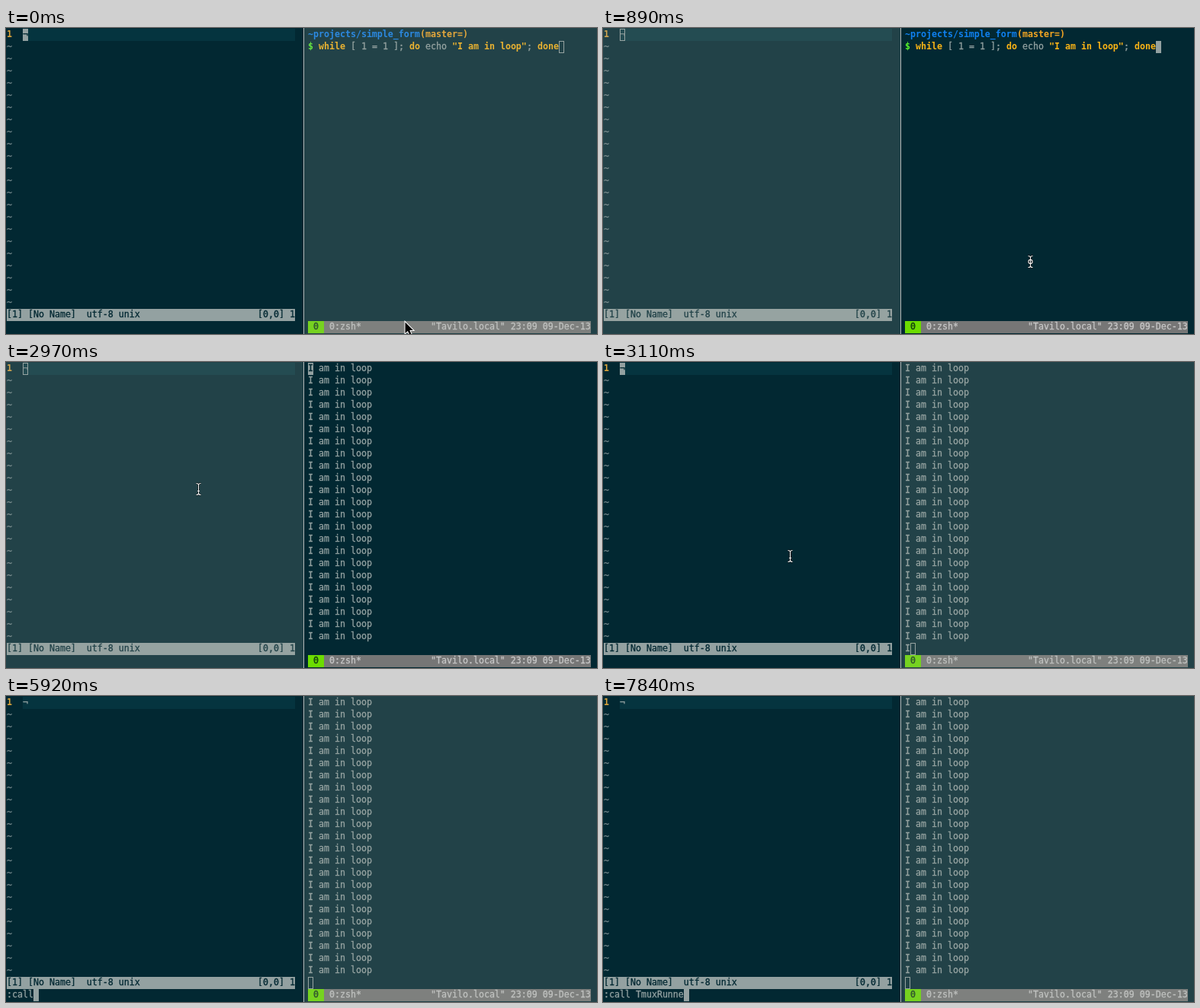
Animation of 775x402 px, one loop 7990 ms. Source, as an HTML page with a canvas:

```html
<!DOCTYPE html>
<html lang="en">
<head>
<meta charset="utf-8">
<title>Editor and terminal split</title>
<style>
html, body { margin: 0; width: 775px; height: 402px; overflow: hidden; background: #022832; }
canvas { display: block; }
</style>
</head>
<body>
<canvas id="stage" width="775" height="402"></canvas>
<script>
const ctx = document.getElementById('stage').getContext('2d');
const W = 775, H = 402, LOOP = 7990, TICK = 147.9, LAST = 53;
const CW = 7, RH = 16, LEFT = 1, RIGHT = 396, SPLIT = 390;
const FACE = '11.627px "DejaVu Sans Mono", monospace';
const C = {
  bg: '#022832', line: '#05343f', text: '#93a1a1', dark: '#022832', tilde: '#75888c',
  number: '#dba43c', blue: '#0f80f0', orange: '#f5a623', yellow: '#fbb416',
  prompt: '#55f02a', green: '#6cdc00', bar: '#767676', barText: '#c6c6c6'
};
const MESSAGE = 'I am in loop';

// Steps of the story
const CLICK_TERMINAL = 6, ENTER = 13, CLICK_EDITOR = 21;

// Typing bursts on the command line
const BURSTS = [
  { from: 32, steps: 1, text: ':' },
  { from: 37, steps: 8, text: 'call Tmux' },
  { from: 50, steps: 4, text: 'Runne' }
];

// Pointer moves in a straight line from a to b, then rests until the end step
const POINTERS = [
  { shape: 'arrow', from: 0, steps: 4, end: CLICK_TERMINAL, a: [523, 386], b: [560, 303] },
  { shape: 'target', from: CLICK_TERMINAL, steps: 1, end: ENTER, a: [560, 307], b: [560, 307] },
  { shape: 'beam', from: 17, steps: 3, end: CLICK_EDITOR, a: [552, 377], b: [252, 167] },
  { shape: 'beam', from: CLICK_EDITOR, steps: 1, end: 30, a: [245, 255], b: [245, 255] }
];

const clamp = v => Math.max(0, Math.min(1, v));
const rowTop = row => 1 + row * RH;

function box(x, row, cols, color) {
  ctx.fillStyle = color;
  ctx.fillRect(x, rowTop(row), cols * CW, RH);
}

// A hairline stroke gives the glyphs a little more weight
function print(str, x, row, color, bold) {
  const y = 12 + row * RH;
  ctx.font = (bold ? 'bold ' : '') + FACE;
  ctx.fillStyle = ctx.strokeStyle = color;
  ctx.lineWidth = 0.3;
  ctx.fillText(str, x, y);
  if (!bold) ctx.strokeText(str, x, y);
  return x + str.length * CW;
}

function printRuns(runs, x, row) {
  for (const [str, color, bold] of runs) x = print(str, x, row, color, bold);
}

function caret(x, row, focused, char = '') {
  if (focused) {
    box(x, row, 1, C.text);
    print(char, x, row, C.dark);
  } else {
    ctx.strokeStyle = C.text;
    ctx.lineWidth = 1;
    ctx.strokeRect(x + 0.5, rowTop(row) + 0.5, CW - 1, RH - 1);
  }
}

function dim(x, w) {
  ctx.fillStyle = 'rgba(160,168,160,0.2)';
  ctx.fillRect(x, 0, w, H);
}

function typed(step) {
  return BURSTS.map(({ from, steps, text }) =>
    text.slice(0, Math.floor(text.length * clamp((step - from + 1) / steps)))).join('');
}

function drawEditor(step, focused) {
  const command = typed(step);
  box(LEFT + 3 * CW, 0, 51, C.line);
  print('1', LEFT, 0, C.number, true);
  print('¬', LEFT + 3 * CW, 0, focused ? C.text : C.tilde);
  for (let row = 1; row < 23; row++) print('~', LEFT, row, C.tilde);
  box(LEFT, 23, 54, C.text);
  print('[1] [No Name]  utf-8 unix', LEFT, 23, C.dark);
  print('[0,0] 1', LEFT + 47 * CW, 23, C.dark);
  if (command) caret(print(command, LEFT, 24, C.text), 24, focused);
  else caret(LEFT + 3 * CW, 0, focused, '¬');
  if (!focused) dim(0, SPLIT);
}

function drawPrompt(focused) {
  printRuns([['~projects/simple_form', C.blue, true], ['(master=)', C.orange, true]], RIGHT, 0);
  printRuns([
    ['$ ', C.prompt, true], ['while', C.yellow, true], [' [ 1 = 1 ]; ', C.text],
    ['do', C.yellow, true], [' echo ', C.text], [`"${MESSAGE}"`, C.yellow, true],
    ['; ', C.text], ['done', C.yellow, true]
  ], RIGHT, 1);
  caret(RIGHT + 47 * CW, 1, focused);
}

// The cursor flickers in a short cycle: home, a half-written line, then line start
function drawOutput(step, focused) {
  const phase = step % 6;
  const col = phase === 3 ? (6 * step + 5) % (MESSAGE.length + 1) : 0;
  for (let row = 0; row < 23; row++) print(MESSAGE, RIGHT, row, C.text);
  print(MESSAGE.slice(0, col), RIGHT, 23, C.text);
  if (phase === 2) caret(RIGHT, 0, focused, 'I');
  else caret(RIGHT + col * CW, 23, focused);
}

function drawTerminal(step, focused) {
  if (step < ENTER) drawPrompt(focused);
  else drawOutput(step, focused);
  box(RIGHT, 24, 53, C.bar);
  box(RIGHT, 24, 3, C.green);
  print('0', RIGHT + CW, 24, '#123c12');
  print('0:zsh*', RIGHT + 4 * CW, 24, C.barText);
  print('"Tavilo.local" 23:09 09-Dec-13', RIGHT + 23 * CW, 24, C.barText);
  if (!focused) dim(SPLIT + 1, W - SPLIT - 1);
}

const arrow = new Path2D('M0 0V14.5L3.4 11.4L5.6 16.5L8 15.5L5.8 10.5H10.4Z');
const beam = new Path2D('M-3 -7.5Q0 -7.5 0 -5.5Q0 -7.5 3 -7.5M0 -5.5V5.5M-3 7.5Q0 7.5 0 5.5Q0 7.5 3 7.5M-1.5 2.5H1.5');
const ring = new Path2D('M2.6 0A2.6 2.6 0 1 1 -2.6 0A2.6 2.6 0 1 1 2.6 0');

function outline(path, color, width) {
  ctx.strokeStyle = color;
  ctx.lineWidth = width;
  ctx.stroke(path);
}

function drawPointer(step) {
  const move = POINTERS.find(p => step >= p.from && step < p.end);
  if (!move) return;
  const { shape, from, steps, a, b } = move;
  const p = clamp((step - from) / steps);
  const [x, y] = a.map((v, i) => Math.round(v + (b[i] - v) * p));
  ctx.save();
  if (shape === 'arrow') {
    ctx.translate(x + 0.5, y + 0.5);
    outline(arrow, '#fff', 2);
    ctx.fillStyle = '#000';
    ctx.fill(arrow);
  } else {
    const paths = shape === 'target' ? [beam, ring] : [beam];
    ctx.translate(x + 0.5, y);
    for (const path of paths) outline(path, 'rgba(0,0,0,0.7)', 2.6);
    for (const path of paths) outline(path, '#f4f4f4', 1.1);
  }
  ctx.restore();
}

function render() {
  const step = Math.min(LAST, Math.floor((performance.now() % LOOP) / TICK));
  const inTerminal = step >= CLICK_TERMINAL && step < CLICK_EDITOR;
  ctx.fillStyle = C.bg;
  ctx.fillRect(0, 0, W, H);
  drawEditor(step, !inTerminal);
  drawTerminal(step, inTerminal);
  ctx.fillStyle = '#b4b8b8';
  ctx.fillRect(SPLIT, 0, 1, H);
  drawPointer(step);
  requestAnimationFrame(render);
}
render();
</script>
</body>
</html>
```
